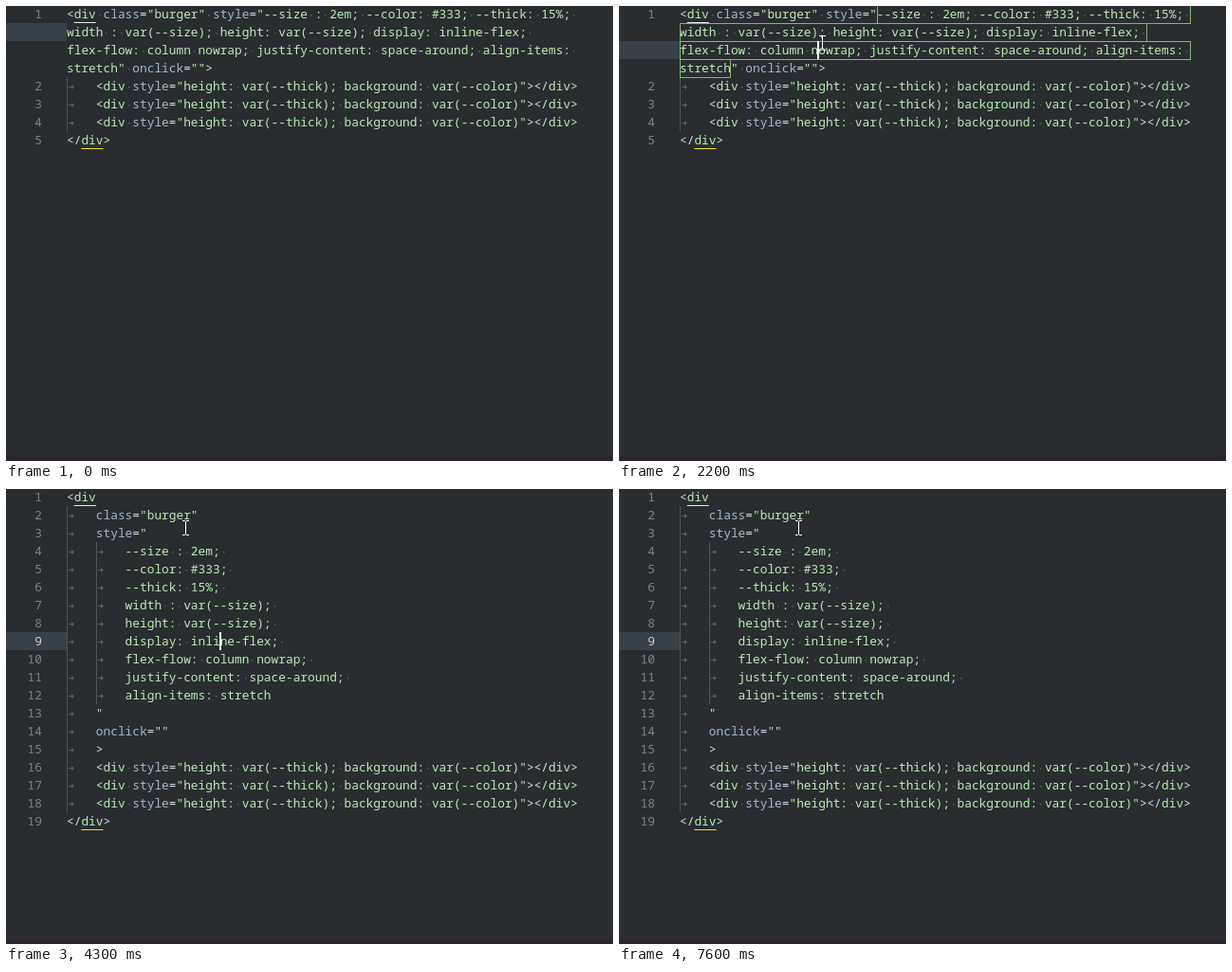
An HTML page with a canvas for the animation above (8 s loop, 640 by 480 pixels).

```html
<!DOCTYPE html>
<html lang="en">
<head>
<meta charset="utf-8">
<title>Splitting markup over several lines</title>
<style>
  html, body { margin: 0; width: 100%; height: 100%; overflow: hidden; background: #292d30; }
  canvas { display: block; }
</style>
</head>
<body>
<canvas id="stage" width="640" height="480"></canvas>
<script>
const ctx = document.getElementById("stage").getContext("2d");
const LOOP = 8000, STEP = 100, BLINK = 470;
const LEFT = 64, ADVANCE = 7.698, ROW = 19, TAB = 4;
const FONT = '12.83px "Noto Sans Mono", "DejaVu Sans Mono", monospace';
const color = {
  back: "#292d30", strip: "#2b232b", active: "#384048", number: "#84827e",
  activeNumber: "#d0d0cc", blank: "#5b5f60", guide: "#55554f", string: "#bbeab5",
  attr: "#a3b8d0", punct: "#d8dfe2", box: "#86b376", white: "#ffffff",
  openTag: "#e4e8e8", closeTag: "#f0e020"
};

const rules = ["--size : 2em", "--color: #333", "--thick: 15%", "width : var(--size)",
  "height: var(--size)", "display: inline-flex", "flex-flow: column nowrap",
  "justify-content: space-around", "align-items: stretch"];
const bar = '\t<div style="height: var(--thick); background: var(--color)"></div>';
const ending = [bar, bar, bar, "</div>"];

// A leading "~" marks the continuation of a wrapped line.
const oneLine = [
  '<div class="burger" style="' + rules.slice(0, 3).join("; ") + "; ",
  "~" + rules.slice(3, 6).join("; ") + "; ",
  "~flex-flow: column nowrap; justify-content: space-around; align-items: ",
  '~stretch" onclick="">',
  ...ending
];
const attributes = [
  "<div", '\tclass="burger"',
  '\tstyle="' + rules.slice(0, 4).join("; "),
  "~\t; height: var(--size); display: inline-flex; flex-flow: column ",
  '~\tnowrap; justify-content: space-around; align-items: stretch"',
  '\tonclick=""', "\t>", ...ending
];
const properties = [
  "<div", '\tclass="burger"', '\tstyle="',
  ...rules.join("; \n").split("\n").map(rule => "\t\t" + rule),
  '\t"', '\tonclick=""', "\t>", ...ending
];

// The caret starts a lit half-period at the time "lit".
const views = [
  { start: 0, lit: 300, lines: oneLine, row: 1, col: 19 },
  { start: 1300, lit: 1290, lines: oneLine, row: 2, col: 19 },
  { start: 2600, lit: 2540, lines: attributes, row: 3, col: 64 },
  { start: 4300, lit: 4320, lines: properties, row: 8, col: 21 }
];
const moves = [
  { start: 400, end: 800, from: [13, 3], to: [214, 39] },
  { start: 3600, end: 3900, from: [214, 39], to: [189, 41] }
];

const current = (list, t) => list.findLast(({ start }) => start <= t);
const colX = col => LEFT + col * ADVANCE;
const rowY = row => row * ROW - 1;

function rect(fill, x, y, w, h) {
  ctx.fillStyle = fill;
  ctx.fillRect(x, y, w, h);
}

function triangle(fill, ...points) {
  ctx.fillStyle = fill;
  ctx.beginPath();
  points.forEach(([x, y]) => ctx.lineTo(x, y));
  ctx.fill();
}

function text(str, x, row, fill) {
  ctx.fillStyle = fill;
  ctx.fillText(str, x, rowY(row) + 14);
}

function drawTab(col, row, wrapped) {
  const x = Math.round(colX(col)), y = rowY(row);
  rect(color.guide, x, y, 1, ROW);
  if (wrapped) return;
  rect(color.blank, x + 2, y + 10, 5, 1);
  triangle(color.blank, [x + 5, y + 8], [x + 8, y + 10.5], [x + 5, y + 13]);
}

function tokenColor(token, quoted) {
  if (quoted || token === '"' || token === "div") return color.string;
  return /\w/.test(token) ? color.attr : color.punct;
}

function drawLine(line, row, quoted) {
  const wrapped = line[0] === "~";
  let col = 0;
  for (const token of line.replace("~", "").match(/\w+|[^]/g)) {
    if (token === "\t") {
      drawTab(col, row, wrapped);
      col += TAB;
      continue;
    }
    if (token === " ") {
      rect(color.blank, Math.round(colX(col) + 3), rowY(row) + 10, 1.5, 1.5);
    } else {
      const fill = tokenColor(token, quoted);
      [...token].forEach((char, i) => text(char, colX(col + i), row, fill));
      if (token === '"') quoted = !quoted;
    }
    col += token.length;
  }
  return quoted;
}

function drawCode({ lines, row: activeRow }) {
  let number = 0, quoted = false;
  lines.forEach((line, row) => {
    if (line[0] !== "~") {
      const label = String(++number);
      text(label, 38 - label.length * ADVANCE, row,
        row === activeRow ? color.activeNumber : color.number);
    }
    quoted = drawLine(line, row, quoted);
  });
  rect(color.openTag, colX(1), rowY(0) + 18, 3 * ADVANCE, 1);
  rect(color.closeTag, colX(2), rowY(lines.length - 1) + 18, 3 * ADVANCE, 1);
}

// Outlines the style value, one box for each row it covers.
function drawStringBox() {
  ctx.strokeStyle = color.box;
  oneLine.slice(0, 4).forEach((line, row) => {
    const code = line.replace("~", "");
    const first = row === 0 ? code.indexOf("--") : 0;
    const last = row === 3 ? code.indexOf('"') : code.length;
    const x = Math.round(colX(first)), right = Math.round(colX(last));
    ctx.strokeRect(x + 0.5, rowY(row) + 0.5, right - x - 1, ROW);
  });
}

function drawPointer(t) {
  const move = current(moves, t);
  if (!move) return;
  const p = Math.min(1, (t - move.start) / (move.end - move.start));
  const eased = p * (2 - p);
  const [x, y] = move.from.map((a, i) => Math.round(a + (move.to[i] - a) * eased));
  if (x < LEFT) {
    triangle(color.white, [x, y], [x, y + 16], [x + 11, y + 11]);
    return;
  }
  for (const end of [-8, 7]) {
    rect(color.white, x - 3, y + end, 3, 1);
    rect(color.white, x + 1, y + end, 3, 1);
  }
  rect(color.white, x, y - 7, 1, 14);
}

function draw(t) {
  const view = current(views, t);
  const caretLit = Math.floor((t + STEP / 2 - view.lit) / BLINK) % 2 === 0;
  rect(color.back, 0, 0, 640, 480);
  rect(color.strip, 0, 476, 640, 4);
  rect(color.active, 0, rowY(view.row), LEFT, ROW);
  ctx.font = FONT;
  drawCode(view);
  if (t >= 400 && t < 1000) triangle(color.number, [48, 7], [58, 7], [53, 12]);
  if (t >= 1500 && t < 2600) drawStringBox();
  if (caretLit || t === view.start && t > 0) {
    rect(color.white, Math.floor(colX(view.col) - 0.5), rowY(view.row), 2, ROW);
  }
  drawPointer(t);
}

function tick() {
  const t = performance.now() % LOOP;
  draw(Math.floor(t / STEP) * STEP);
  requestAnimationFrame(tick);
}
tick();
</script>
</body>
</html>
```
